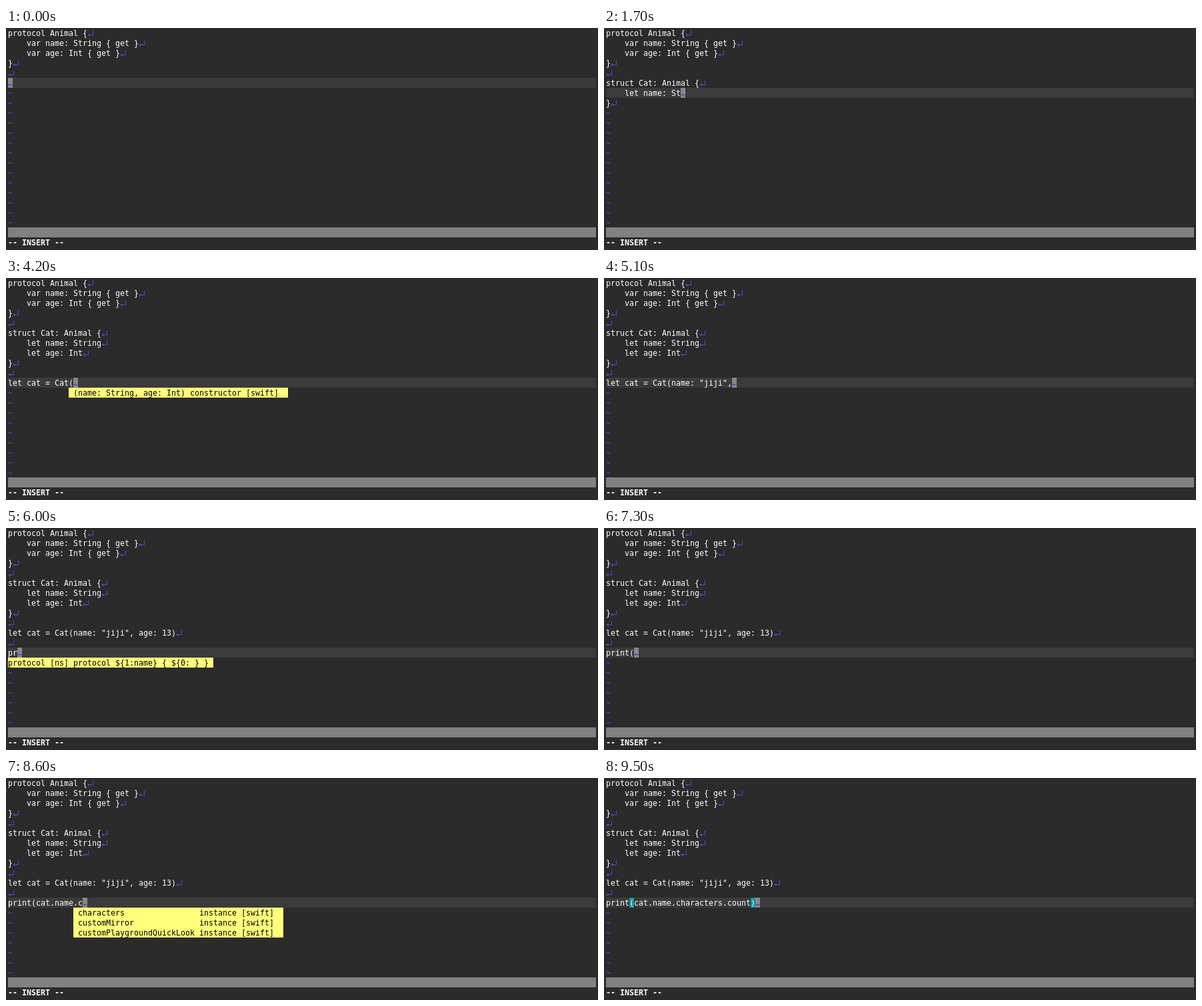
Write an HTML page with a canvas that moves like this. It is 888 by 334 pixels and loops after 9600 ms.

```html
<!DOCTYPE html>
<html lang="en">
<head>
<meta charset="utf-8">
<title>Swift completion in a terminal editor</title>
<style>
html, body { margin: 0; width: 100%; height: 100%; overflow: hidden; background: #2b2b2b; }
canvas { display: block; }
</style>
</head>
<body>
<canvas id="stage" width="888" height="334"></canvas>
<script>
const ctx = document.getElementById('stage').getContext('2d');
const LOOP = 9600, STEP = 100;
const LEFT = 3, CELL = 7, ROW = 15, WIDTH = 882, STATUS_ROW = 20;
const FONT = '11.6px "DejaVu Sans Mono", monospace';
const PURPLE = '#6440d2', WHITE = '#fff';

// Each line is a list of typed pieces: [start ms, end ms, text].
const still = text => [[-1, -1, text]];
const LINES = [
  still('protocol Animal {'),
  still('    var name: String { get }'),
  still('    var age: Int { get }'),
  still('}'),
  still(''),
  [[0, 1000, 'struct Cat: Animal {']],
  [[1100, 1100, '    '], [1100, 1900, 'let name: String']],
  [[2000, 2000, '    '], [2000, 2600, 'let age: Int']],
  [[1050, 1050, '}']],
  [[3100, 3100, '']],
  [[3200, 4100, 'let cat = Cat('], [4500, 5500, 'name: "jiji", age: 13)']],
  [[5600, 5600, '']],
  [[5700, 5900, 'pr'], [6400, 7200, 'int('], [7400, 8500, 'cat.name.c'],
   [8800, 8800, 'haracters'], [8900, 9400, '.count)']]
];

const instance = name => ' ' + name.padEnd(26) + 'instance [swift]  ';
const POPUPS = {
  'let cat = Cat(': { col: 13, items: [' (name: String, age: Int) constructor [swift]  '] },
  'pr': { col: 0, items: ['protocol [ns] protocol ${1:name} { ${0: } } '] },
  'print(cat.name.c': {
    col: 14,
    items: ['characters', 'customMirror', 'customPlaygroundQuickLook'].map(instance)
  }
};

const xOf = col => LEFT + col * CELL;

function typed(pieces, t) {
  return pieces.map(([start, end, text]) => {
    if (t >= end) return text;
    const part = Math.max(0, (t - start) / (end - start));
    return text.slice(0, Math.floor(part * text.length + 1e-6));
  }).join('');
}

function cells(row, col, count, color) {
  ctx.fillStyle = color;
  ctx.fillRect(xOf(col), row * ROW, count * CELL, ROW);
}

function write(text, row, col, color, weight = '') {
  ctx.font = weight + ' ' + FONT;
  ctx.fillStyle = color;
  [...text].forEach((char, i) => ctx.fillText(char, xOf(col + i), row * ROW + 12));
}

function lineEnd(row, col, clipped) {
  const x = xOf(col), y = row * ROW;
  ctx.save();
  ctx.beginPath();
  ctx.rect(x, y, clipped ? CELL : 10, ROW);
  ctx.clip();
  ctx.strokeStyle = ctx.fillStyle = PURPLE;
  ctx.beginPath();
  ctx.moveTo(x + 8.5, y + 4);
  ctx.lineTo(x + 8.5, y + 10.5);
  ctx.lineTo(x + 2, y + 10.5);
  ctx.stroke();
  ctx.beginPath();
  ctx.moveTo(x, y + 10.5);
  ctx.lineTo(x + 3.5, y + 8.5);
  ctx.lineTo(x + 3.5, y + 12.5);
  ctx.fill();
  ctx.restore();
}

function draw(t) {
  ctx.fillStyle = '#2b2b2b';
  ctx.fillRect(0, 0, 888, 334);

  const shown = LINES.filter(line => line[0][0] <= t);
  const latest = Math.max(...shown.map(line => line[0][0]));
  const cursorRow = shown.findIndex(line => line[0][0] === latest && latest >= 0);

  shown.forEach((line, row) => {
    const text = typed(line, t), active = row === cursorRow;
    if (active) {
      cells(row, 0, WIDTH / CELL, '#3b3b3b');
      cells(row, text.length, 1, '#888');
      if (text.endsWith(')')) {
        for (const col of [text.indexOf('('), text.length - 1]) cells(row, col, 1, '#009aa0');
      }
    }
    write(text, row, 0, WHITE);
    lineEnd(row, text.length, active);
  });

  for (let row = shown.length; row < STATUS_ROW; row++) write('~', row, 0, PURPLE);

  const popup = POPUPS[typed(shown[cursorRow], t)];
  if (popup) popup.items.forEach((item, i) => {
    const row = cursorRow + 1 + i;
    cells(row, popup.col, item.length, '#ffff7c');
    write(item, row, popup.col, '#000');
  });

  cells(STATUS_ROW, 0, WIDTH / CELL, '#818181');
  write('-- INSERT --', STATUS_ROW + 1, 0, WHITE, 'bold');
}

const begin = performance.now();
function frame() {
  const t = (performance.now() - begin) % LOOP;
  draw(Math.floor(t / STEP) * STEP);
  requestAnimationFrame(frame);
}
frame();
</script>
</body>
</html>
```
